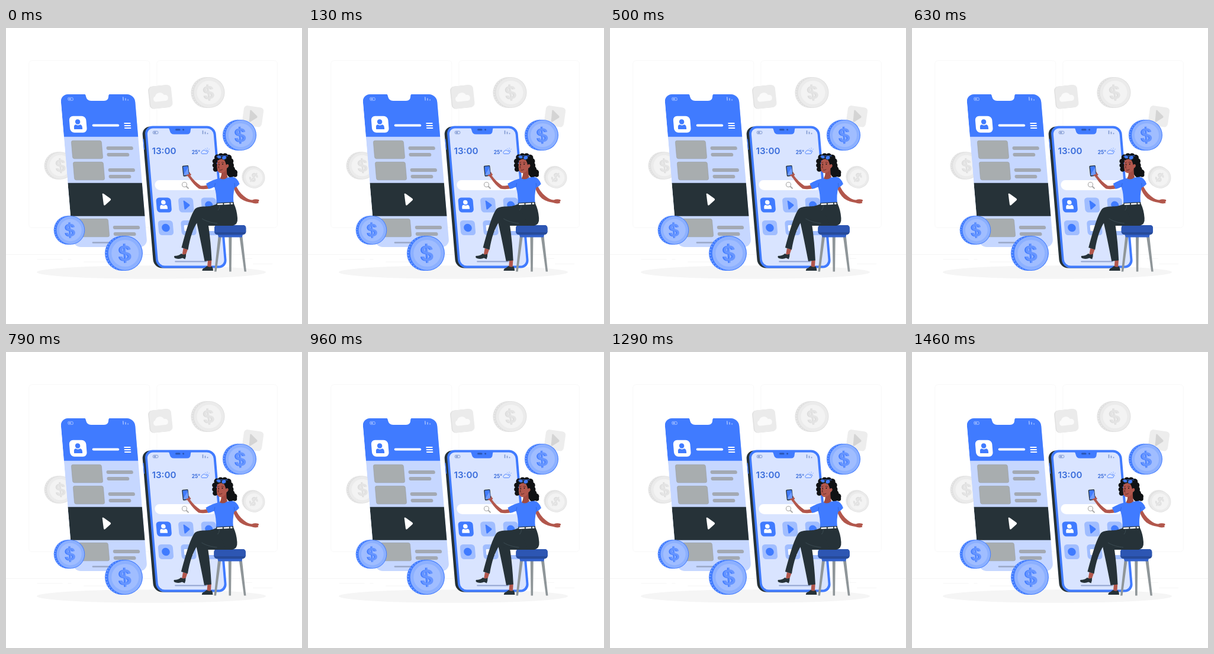
Animation, 500 px wide and 500 px high, one loop 1500 ms. Source, as an HTML page:

```html
<!DOCTYPE html>
<html lang="en">
<head>
<meta charset="utf-8">
<title>Mobile apps</title>
<style>
  html, body { margin: 0; width: 100%; height: 100%; overflow: hidden; background: #fff; }
  svg { display: block; width: 100vw; height: 100vh; }
  text { font-family: Inter, Lato, sans-serif; font-weight: 600; }
  .blue { --rim: #407bff; --ridge: #79a3ff; --ring: #8cb0ff; --disc: #a0bdff; --low: #407bff; --sign: #6695ff; }
  .gray { --rim: #e0e0e0; --ridge: #ebebeb; --ring: #ebebeb; --disc: #f3f3f3; --low: #dbdbdb; --sign: #e4e4e4; }
</style>
</head>
<body>
<svg viewBox="0 0 500 500">
  <defs>
    <g id="coin">
      <ellipse cx="-2.500" rx="26" ry="26" fill="var(--rim)"/>
      <path d="M-3 -24.500A24 24.500 0 0 0 -3 24.500" fill="none" stroke="var(--ridge)" stroke-width="3.500" stroke-dasharray="1.500 3"/>
      <ellipse cx="2" rx="26.500" ry="26" fill="var(--rim)"/>
      <ellipse cx="2" rx="25.500" ry="25.200" fill="var(--ring)"/>
      <ellipse cx="2" rx="20.500" ry="20" fill="var(--disc)"/>
    </g>
    <g id="sign" font-size="31" text-anchor="middle">
      <text x="-1" y="11.300" fill="var(--low)">$</text>
      <text x=".8" y="11.300" fill="var(--sign)">$</text>
    </g>
    <g id="person">
      <circle cy="-4.500" r="4.200"/>
      <path d="M-7 8V5Q-7 .5 -3.500 .3Q0 2.500 3.500 .3Q7 .5 7 5V8Z"/>
    </g>
    <path id="play" d="M-6 -9Q-5.500 -11 -3.500 -9.500L7 -1.500Q8.500 0 7 1.500L-2.500 9.500Q-5 11 -5.200 8.500Z"/>
    <g id="status">
      <rect x=".5" y=".5" width="8.500" height="4.500" rx="1.500" fill="none" stroke="currentColor"/>
      <rect x="2" y="1.700" width="3.500" height="2.200" fill="currentColor"/>
    </g>
    <path id="bars" d="M0 0V6M4 2V6M8 4V6" fill="none" stroke="currentColor" stroke-width="1.600"/>
    <rect id="tile" x="-12.500" y="-12.500" width="25" height="25" rx="5.500"/>
    <path id="cloud" d="M-9 6.500A4.800 4.800 0 0 1 -9 -2.500A8.500 8.500 0 0 1 6.500 -3.500A5 5 0 1 1 9 6.500Z"/>
  </defs>

  <!-- Backdrop -->
  <g fill="none" stroke="#f5f5f5" stroke-width=".7">
    <rect x="38.800" y="55" width="204" height="282.500" rx="5"/>
    <rect x="254.800" y="55" width="203.500" height="282.500" rx="5"/>
  </g>
  <g stroke="#ebebeb" stroke-width=".5">
    <path d="M0 382.500H500"/>
    <path d="M417 398.600h33M322 401.300h9M396.500 389.300h19M52.500 391h43M104.500 391h6M131.500 395.200h94"/>
  </g>
  <ellipse cx="245.500" cy="412.500" rx="193.500" ry="11.300" fill="#f5f5f5"/>

  <g class="gray">
    <use href="#coin" transform="translate(90 232.500) scale(.89)"/>
    <use href="#sign" transform="translate(92 232.500) rotate(-5) scale(.88)"/>
    <use href="#coin" transform="translate(341 109)"/>
    <use href="#sign" transform="translate(342 109) rotate(-8) scale(.96)"/>
    <use href="#coin" transform="translate(418 252) rotate(30) scale(.69)"/>
    <use href="#sign" transform="translate(418.500 252.500) rotate(38) scale(.64)"/>
  </g>
  <g transform="translate(260.800 116.300) rotate(-6)">
    <rect x="-19.500" y="-19" width="38" height="38" rx="7" fill="#e0e0e0"/>
    <rect x="-18" y="-19" width="37.500" height="38" rx="7" fill="#ebebeb"/>
    <use href="#cloud" transform="translate(0 1)" fill="#fafafa"/>
  </g>
  <g transform="translate(417 149.300) rotate(8)">
    <rect x="-16.800" y="-16.800" width="33.500" height="33.500" rx="6" fill="#ededed"/>
    <use href="#play" fill="#d4d4d4"/>
  </g>

  <!-- Tall phone screen -->
  <clipPath id="sheet"><rect width="125.400" height="258" rx="13"/></clipPath>
  <g transform="matrix(1 0 .084 1 91.800 112)">
    <g clip-path="url(#sheet)">
      <rect width="126" height="258" fill="#c6d7ff"/>
      <rect width="126" height="71.700" fill="#407bff"/>
      <rect y="149.800" width="126" height="56" fill="#263238"/>
      <path d="M40 -1H84.500Q81 0 81 4Q80 11 73 11H51Q44 11 43 4Q43 0 40 -1Z" fill="#fff"/>
    </g>
    <g fill="#a8adaf" stroke="#989da1" stroke-width=".6">
      <rect x="11.800" y="78.300" width="51" height="30.500" rx="3"/>
      <rect x="11.800" y="114.300" width="51" height="30.500" rx="3"/>
      <rect x="11.800" y="210.300" width="51" height="30.500" rx="3"/>
    </g>
    <path d="M73 91h39.500M73 102h32M73 128h39.500M73 139h32M73 225h39.500M73 236h32" stroke="#a3a9b3" stroke-width="5.800" stroke-linecap="round"/>
    <path d="M34 250.500h54" stroke="#9aa8c6" stroke-width="2.400" stroke-linecap="round"/>
    <rect x="11.400" y="36.700" width="28.500" height="28" rx="7" fill="#fff"/>
    <use href="#person" x="25.400" y="51" fill="#407bff"/>
    <path d="M51.500 52.500h41.500" stroke="#fff" stroke-width="4" stroke-linecap="round"/>
    <path d="M104.300 49h9.500M104.300 53h9.500M104.300 57h9.500" stroke="#fff" stroke-width="1.900" stroke-linecap="round"/>
    <use href="#play" x="62.700" y="177.600" fill="#fff"/>
    <g color="#a0bdff">
      <use href="#status" x="11.800" y="5.200"/>
      <use href="#bars" x="105.500" y="4.500"/>
    </g>
  </g>

  <!-- Front phone -->
  <g transform="matrix(1 0 .084 1 233.500 165.500)">
    <rect x="-4" y="1" width="110" height="239" rx="14" fill="#263238"/>
    <path d="M-3.200 22v18" stroke="#407bff" stroke-width="1.400"/>
    <rect x=".5" width="119.500" height="240" rx="14" fill="#407bff"/>
    <rect x="4.200" y="4" width="111.800" height="232" rx="10.500" fill="#d9e4ff"/>
    <path d="M40 2H80Q78 4 77.500 8Q77 14 71 14H49Q43 14 42.500 8Q42 4 40 2Z" fill="#407bff"/>
    <path d="M53.500 6.200h5.500M65.500 6.200h.1" stroke="#2b56b3" stroke-width="3" stroke-linecap="round"/>
    <path d="M33.500 229h52" stroke="#91a4cf" stroke-width="2.200" stroke-linecap="round"/>
    <rect x="9.500" y="91.500" width="104" height="17" rx="8.500" fill="#fff"/>
    <g fill="#a0bdff">
      <use href="#tile" x="22" y="133.500" fill="#407bff"/>
      <use href="#tile" x="59.500" y="133.500"/>
      <use href="#tile" x="98" y="133.500"/>
      <use href="#tile" x="22" y="172"/>
      <use href="#tile" x="60.500" y="172"/>
      <use href="#tile" x="98.500" y="172"/>
    </g>
    <use href="#person" transform="translate(21.500 133) scale(.9)" fill="#fff"/>
    <use href="#play" transform="translate(60 133.500) scale(.75)" fill="#407bff"/>
    <circle cx="98" cy="133.500" r="6.500" fill="#407bff"/>
    <circle cx="22" cy="172" r="6.800" fill="#407bff"/>
    <rect x="53" y="167.500" width="15" height="10" rx="1.500" fill="#fff"/>
    <rect x="91" y="167.500" width="15" height="10" rx="1.500" fill="#fff"/>
  </g>
  <g color="#7f97cf">
    <use href="#status" x="247.800" y="173.800"/>
    <use href="#bars" x="332.500" y="173.300"/>
  </g>
  <g fill="#3a6ddb">
    <text x="246.500" y="212.700" font-size="15.200">13:00</text>
    <text x="313.800" y="212.700" font-size="8.300" style="font-weight:700">25°</text>
  </g>
  <g fill="none" stroke="#407bff" stroke-width=".8">
    <path d="M338 206.500a3 3 0 0 1 4 3M340 202.500v1.200M343.500 204.500l-1 .8M336.500 203.500l.7 1"/>
    <use href="#cloud" transform="translate(335 209.700) scale(.43)" stroke-width="2"/>
  </g>
  <g fill="none" stroke="#a6a6a6" stroke-width="1.100">
    <circle cx="301.500" cy="264.500" r="4"/>
    <path d="M304.500 267.500l4 3.800" stroke-width="1.800"/>
  </g>

  <g class="blue">
    <use href="#coin" transform="translate(394.500 181)"/>
    <use href="#sign" transform="translate(395.500 181) rotate(-3)"/>
    <use href="#coin" transform="translate(107 341.500) scale(.92 .935)"/>
    <use href="#sign" transform="translate(108 341.500) rotate(-3) scale(.92)"/>
    <use href="#coin" transform="translate(199 380.500) scale(1.120 1.130)"/>
    <use href="#sign" transform="translate(200.500 380.500) rotate(-3) scale(1.130)"/>
  </g>

  <!-- Woman on the stool -->
  <g id="woman">
    <path d="M358.500 353h5L355.500 411.500h-3.500ZM376.300 353h5L380.600 411.500h-3.500ZM394.500 353h5L406 411.500h-3.500Z" fill="#8f9699"/>
    <path d="M357.500 348H400L399 353.500H359Z" fill="#3362cc"/>
    <rect x="352" y="333" width="53.300" height="16.200" rx="5" fill="#264a99"/>
    <path d="M352 345V338Q352 333 357 333H400.300Q405.300 333 405.300 338V345Z" fill="#2d56b3"/>

    <path d="M341 392L347.300 391.500L346.500 404H340Z" fill="#b2574c"/>
    <path d="M339.500 402Q344 405 348 402.500Q350 406 350 410H331.500Q331 406.500 335 405.500Z" fill="#263238"/>
    <path d="M299.500 372L307 374L303.500 384H297.500Z" fill="#b2574c"/>
    <path d="M296 381Q300 384 304 381.500Q304.500 386 302.500 390.500L298 388.500Q293 391 286 389Q283 387.500 284.500 385Q292 385 296 381Z" fill="#263238"/>

    <path d="M320 320Q325 340 335.500 394L347.500 392.500Q346 362 342 334H383Q392 332 391 321Q390 307 385 297H357Q345 302 333 303Z" fill="#263238"/>
    <path d="M357 299C344 303 326 299 319 306C311 317 303 347 296.500 371L307.500 374.500C311 354 316 338 324 327C342 332 362 333 372 332Z" fill="#263238"/>
    <path d="M331 322C339 327 348 329 357 330M361 300Q361 305 358 308" fill="none" stroke="#46565e" stroke-width=".7"/>

    <g id="hair" fill="#101214"></g>

    <path d="M388 264Q392 276 402 284Q409 290 416 290.500Q421 288.500 427 290Q428.500 292 426 293.500L427 295.500Q421 297.500 415 295Q404 293.500 396 288Q387 280 384 268Z" fill="#b2574c"/>
    <path d="M345 264Q335 267 329 266.500Q318 259 311.500 249.500Q312 245 309.500 243L306 246Q306.500 251 309.500 253.500Q317 265 326 271.500Q336 273.500 347 270Z" fill="#b2574c"/>
    <g transform="translate(303.800 241.300) rotate(-6)">
      <rect x="-5.300" y="-9" width="10.500" height="18" rx="1.500" fill="#263238"/>
      <rect x="-4" y="-7.700" width="8.300" height="15" rx=".8" fill="#407bff"/>
      <path d="M-4 5.500L4.300 -5.500V7.300H-4Z" fill="#6f9bff"/>
    </g>
    <path d="M306 249l5.500 -1.500" stroke="#b2574c" stroke-width="2.600" stroke-linecap="round"/>

    <path d="M360 254Q351 255.500 338 263L342 272Q347 271 352 268.500Q356 280 355.500 296.500L384.500 295Q383 283 386 270Q391 268 394.500 263.500Q391 253 383 251.500Z" fill="#407bff"/>
    <path d="M352 268.500Q353 265 353.500 262M386 270Q387 266 386 262" fill="none" stroke="#2f62d6" stroke-width=".8"/>
    <path d="M355.500 295.500L384.500 294L385 298.500L356 300Z" fill="#263238"/>
    <path d="M357 297.800L383 296.500" stroke="#fff" stroke-width="2.600" stroke-dasharray="9.500 1.800"/>

    <path d="M364 240L373 234Q372.500 246 374.500 252Q368 258 361.500 254Q365 249 364 240Z" fill="#a14b41"/>
    <path d="M357.500 224Q355.500 234 357.500 241.500Q360 246 366 244.500Q371.500 242.500 373.500 236Q377 235 376 231Q374 229 372 231.500Q370.500 225 368 222Q362 220 357.500 224Z" fill="#b2574c"/>
    <path d="M358.500 227.500l2 -.6M364.500 227q2 -.8 3.500 .5M360 232l-1.500 4 1.800 .4M360.500 240q2.500 1 5 -1" fill="none" stroke="#4b211d" stroke-width=".8" stroke-linecap="round"/>
    <circle cx="359.800" cy="230.300" r=".9" fill="#101214"/>
    <circle cx="366" cy="230" r=".9" fill="#101214"/>
    <path d="M355 217.500Q362 215 375 216" fill="none" stroke="#2c56b5" stroke-width="1.300"/>
    <g fill="#407bff" stroke="#263238" stroke-width=".8">
      <ellipse cx="360" cy="217.800" rx="3.800" ry="2.800" transform="rotate(20 360 217.800)"/>
      <ellipse cx="368.500" cy="219" rx="4" ry="3.300" transform="rotate(-20 368.500 219)"/>
    </g>
  </g>
</svg>
<script>
  const LOOP = 1500, POSES = 36;
  // Sideways offset at every tenth of the shake
  const SHAKE = [0, -1, 2, -4, 4, -4, 4, -4, 2, -1, 0];
  const woman = document.getElementById('woman');

  // Curls: x, y, radius
  const curls = [
    [353, 225, 4.3], [353, 232, 4.3], [354, 238.500, 4.3], [357, 218.500, 5], [363, 216.500, 5],
    [370, 216.500, 5], [376, 219, 5.300], [379, 225, 5.300], [379, 232, 6], [381, 239, 6],
    [386, 244, 5], [387, 248, 3.800], [380, 246, 6.500], [374, 242, 6], [367, 227, 10]
  ];
  document.getElementById('hair').innerHTML =
    curls.map(([x, y, r]) => `<circle cx="${x}" cy="${y}" r="${r}"/>`).join('');

  function offset(p) {
    const i = Math.min(Math.floor(p * 10), 9);
    return SHAKE[i] + (SHAKE[i + 1] - SHAKE[i]) * (p * 10 - i);
  }

  function draw() {
    // Delays are rounded to 10 ms, hence the small lead
    const pose = Math.floor(((performance.now() + 4) % LOOP) / (LOOP / POSES));
    woman.setAttribute('transform', `translate(${offset(pose / (POSES - 1)).toFixed(3)} 0)`);
    requestAnimationFrame(draw);
  }
  draw();
</script>
</body>
</html>
```
